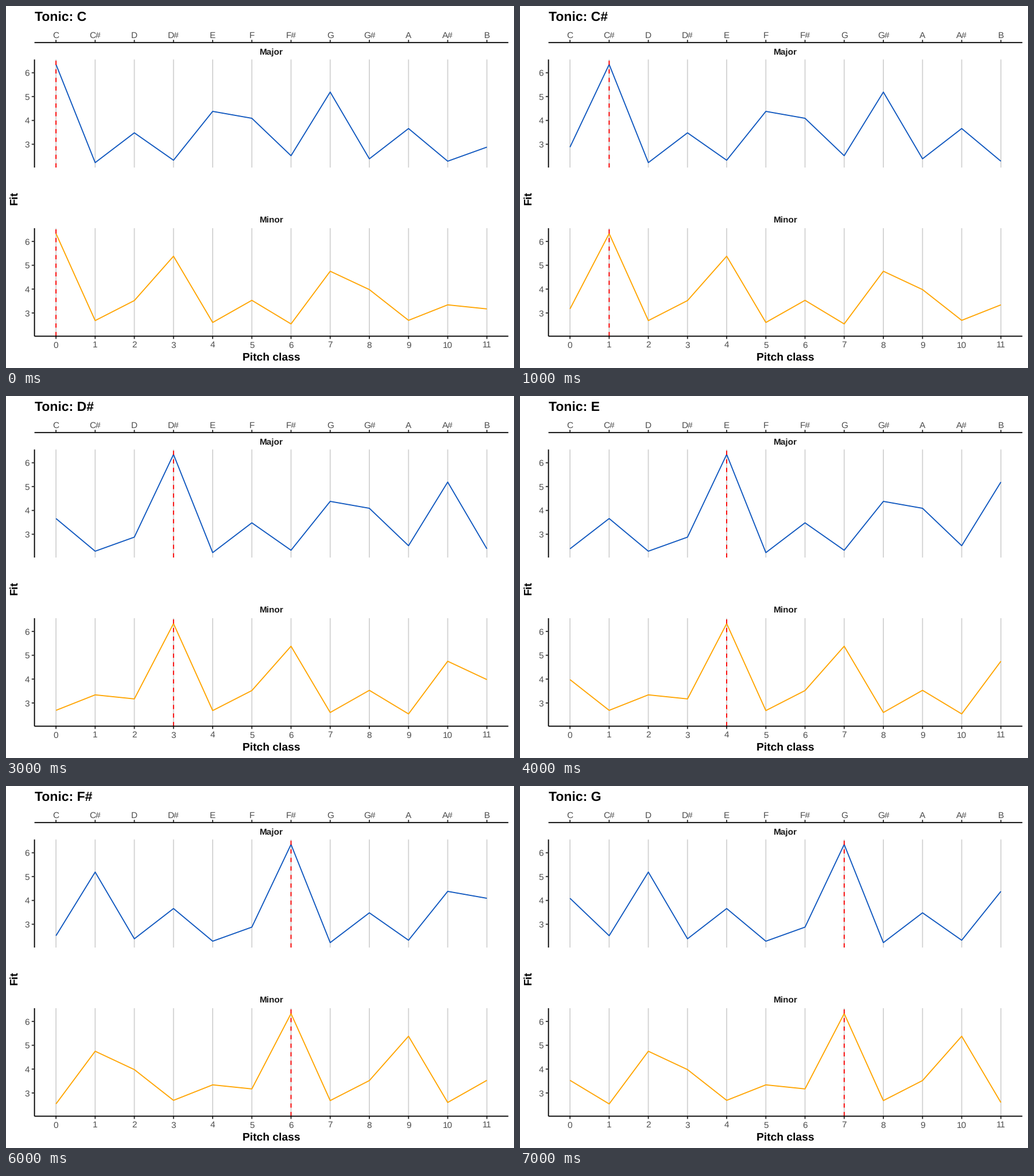
A matplotlib script for the animation above (8000 ms loop, 885 px wide and 632 px high).

```python
import matplotlib.pyplot as plt
import numpy as np
from matplotlib.animation import FuncAnimation

W, H, DPI = 885, 632, 64
PT = 72 / DPI  # points per pixel
LINE = 1.865

NOTES = ["C", "C#", "D", "D#", "E", "F", "F#", "G", "G#", "A", "A#", "B"]
MAJOR = [6.35, 2.23, 3.48, 2.33, 4.38, 4.09, 2.52, 5.19, 2.39, 3.66, 2.29, 2.88]
MINOR = [6.33, 2.68, 3.52, 5.38, 2.60, 3.53, 2.54, 4.75, 3.98, 2.69, 3.34, 3.17]

LEFT, RIGHT = 49.6, 875.2
X = 87.1 + 68.24 * np.arange(12)
UNIT, PANEL_H, Y_MAX = 41.62, 188.6, 6.556
TICK = 4.8
TOP_AXIS = 63.8

plt.rcParams["font.family"] = "Liberation Sans"
plt.rcParams["text.hinting"] = "no_hinting"

fig = plt.figure(figsize=(W / DPI, H / DPI), dpi=DPI, facecolor="white")
ax = fig.add_axes([0, 0, 1, 1])
ax.set_xlim(0, W)
ax.set_ylim(H, 0)
ax.axis("off")


def line(xs, ys, color="black", **kw):
    kw.setdefault("solid_capstyle", "butt")
    return ax.plot(xs, ys, color=color, lw=LINE * PT, snap=False, **kw)[0]


def label(x, y, text, size=15.36, color="#4d4d4d", ha="center", **kw):
    return ax.text(x, y, text, fontsize=size * PT, color=color, ha=ha,
                   va="baseline", **kw)


class Panel:
    def __init__(self, name, top, profile, color):
        self.top, self.bottom = top, top + PANEL_H
        self.profile = np.array(profile)
        for x in X:
            line([x, x], [self.bottom, top], "#d3d3d3")
        line([LEFT, LEFT], [self.bottom, top])
        for v in range(3, 7):
            y = self.y(v)
            line([LEFT - TICK, LEFT], [y, y], "#333333")
            label(41, y + 5.5, str(v), ha="right")
        label(462.4, top - 9, name, color="#1a1a1a", weight="bold")
        self.curve = line(X, self.y(self.profile), color,
                          solid_joinstyle="round")
        self.marker = line([X[0]] * 2, [self.bottom, top], "red",
                           linestyle=(0, (4, 4)))

    def y(self, value):
        return self.top + (Y_MAX - value) * UNIT

    def show(self, tonic):
        self.curve.set_ydata(self.y(np.roll(self.profile, tonic)))
        self.marker.set_xdata([X[tonic]] * 2)


panels = [Panel("Major", 93.4, MAJOR, "#0f57bf"),
          Panel("Minor", 387.9, MINOR, "#ffa500")]
bottom_axis = panels[1].bottom

for y, end in ((TOP_AXIS, TOP_AXIS - TICK), (bottom_axis, bottom_axis + TICK)):
    for x in X:
        line([x, x], [y, end], "#333333")
    line([LEFT, RIGHT], [y, y])

for i, (x, note) in enumerate(zip(X, NOTES)):
    label(x, 55.5, note)
    label(x, 596.5, str(i))

label(462.4, 618.5, "Pitch class", 19.2, "black", weight="bold")
label(23.5, 335, "Fit", 19.2, "black", weight="bold", rotation=90).set(
    ha="right", va="center")
title = label(LEFT, 26, "", 23.04, "black", ha="left", weight="bold")


def update(tonic):
    title.set_text(f"Tonic: {NOTES[tonic]}")
    for panel in panels:
        panel.show(tonic)
    return []


anim = FuncAnimation(fig, update, frames=8, interval=1000, repeat=True,
                     repeat_delay=0, blit=False)
plt.show()
```
